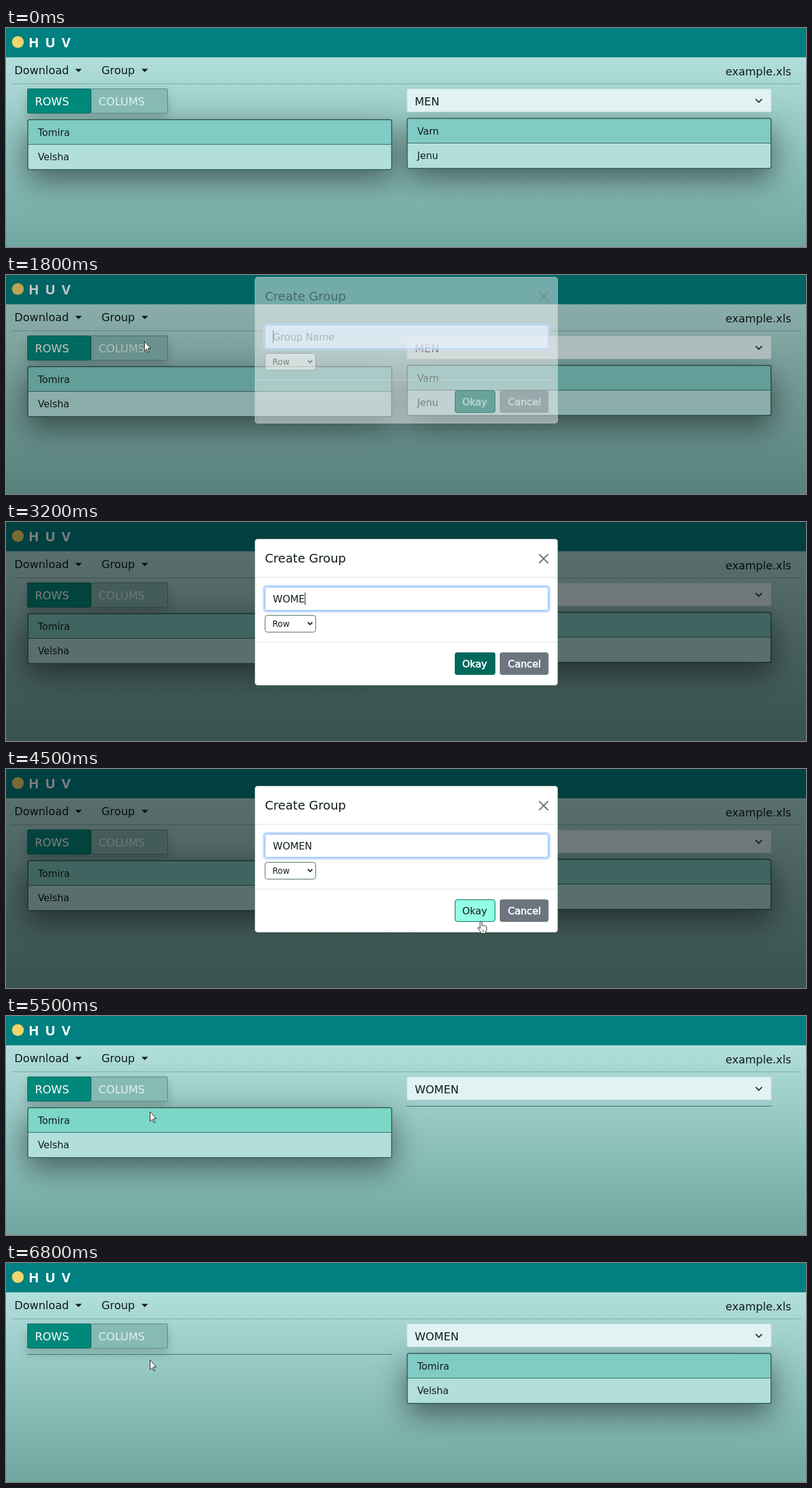
These frames come from a looping animation (1280x351 px, 6900 ms). An HTML page with a canvas:

```html
<!DOCTYPE html>
<html lang="en">
<head>
<meta charset="utf-8">
<title>Group editor</title>
<style>
html, body { margin: 0; width: 100%; height: 100%; overflow: hidden; }
canvas { display: block; }
</style>
</head>
<body>
<canvas id="stage" width="1280" height="351"></canvas>
<script>
const ctx = document.getElementById('stage').getContext('2d');
const LOOP = 6900, STEP = 100;
const SANS = '"DejaVu Sans", Verdana, sans-serif';
const INK = '#101c1b';
const FIRST = 'Tomira', SECOND = 'Velsha', MEN = ['Varn', 'Jenu'];

// Pointer trips: [time, x, y] waypoints; the pointer is hidden outside a trip.
const TRIPS = [
  { end: 2000, points: [[200, 1210, 300], [300, 1058, 314], [400, 760, 225], [500, 445, 122],
    [600, 290, 85], [700, 225, 67], [800, 205, 63], [1200, 205, 63], [1500, 221, 106]] },
  { end: LOOP, points: [[3900, 248, 116], [4100, 410, 157], [4300, 665, 221], [4500, 760, 244],
    [4800, 760, 244], [4900, 742, 236], [5000, 650, 196], [5100, 520, 146], [5200, 385, 119],
    [5300, 290, 128], [5400, 242, 146], [5500, 230, 153], [6700, 230, 153], [6800, 230, 155]] }
];
const ARROW = new Path2D('M.5.5V16L4 12.5 6.5 18 8.5 17.2 6.2 11.5H10.5Z');
const HAND = new Path2D('M-1.5 12V1.5a1.5 1.5 0 0 1 3 0V7l1-.5 2 .7 1-.2 2 .8h.5' +
  'q1 .6 1 2V14l-2 4v1.5H0l-1-3-4-5q-.5-2 1.5-1.5z');

function text(str, x, middle, size, color = INK, weight = 400, family = SANS) {
  ctx.font = `${weight} ${size}px ${family}`;
  ctx.fillStyle = color;
  ctx.fillText(str, x, middle + size * 0.365);
}

// Regular letters thickened slightly, as on the dialog's dark buttons.
function heavyText(str, x, middle, size, color) {
  text(str, x, middle, size, color);
  ctx.strokeStyle = color;
  ctx.lineWidth = 0.6;
  ctx.strokeText(str, x, middle + size * 0.365);
}

function box(x, y, w, h, fill, { radius = 0, border, width = 1, shadow } = {}) {
  ctx.save();
  ctx.beginPath();
  ctx.roundRect(x, y, w, h, radius);
  if (shadow) [ctx.shadowOffsetY, ctx.shadowBlur, ctx.shadowColor] = shadow;
  ctx.fillStyle = fill;
  ctx.fill();
  ctx.restore();
  if (!border) return;
  ctx.beginPath();
  ctx.roundRect(x + width / 2, y + width / 2, w - width, h - width, radius);
  ctx.strokeStyle = border;
  ctx.lineWidth = width;
  ctx.stroke();
}

function line(points, color, width) {
  ctx.beginPath();
  points.forEach(([x, y]) => ctx.lineTo(x, y));
  ctx.strokeStyle = color;
  ctx.lineWidth = width;
  ctx.stroke();
}

function chevron(x, y, size, width) {
  line([[x - size, y - size / 2], [x, y + size / 2], [x + size, y - size / 2]], '#263230', width);
}

function menuTitle(label, x, caretX, color) {
  text(label, x, 68, 17.5, color);
  ctx.beginPath();
  ctx.moveTo(caretX - 5.3, 65.5);
  ctx.lineTo(caretX + 5.3, 65.5);
  ctx.lineTo(caretX, 70.8);
  ctx.fill();
}

const listHeight = rows => 4 + 39 * rows.length;

function listShadow(x, y, rows) {
  if (rows.length) box(x, y, 584, listHeight(rows), '#80cbc4',
    { radius: 4, shadow: [16, 47, 'rgba(0,0,0,.5)'] });
}

function list(x, y, rows, hovered) {
  if (!rows.length) return box(x, y, 584, 1, '#3d706b');
  box(x, y, 584, listHeight(rows), '#b2dfdb', { radius: 4 });
  rows.forEach((name, i) => {
    const top = y + 2 + 39 * i;
    box(x + 1, top, 582, 38, i ? '#b2dfdb' : hovered ? '#7cd7c8' : '#80cbc4');
    if (i) box(x, top - 1, 584, 1, '#356b65');
    text(name, x + 17, top + 19 + i * 0.7, 15.4);
  });
  box(x, y, 584, listHeight(rows), 'transparent', { radius: 3, border: '#35665f', width: 1.7 });
}

function page(t) {
  const sky = ctx.createLinearGradient(0, 45, 0, 351);
  sky.addColorStop(0, '#b2dfdb');
  sky.addColorStop(1, '#6fa6a0');
  box(0, 0, 1280, 351, sky);

  const left = t < 5700 ? [FIRST, SECOND] : t < 6300 ? [SECOND] : [];
  const right = t < 4700 ? MEN : t < 5700 ? [] : t < 6300 ? [FIRST] : [FIRST, SECOND];
  listShadow(34, 146, left);
  listShadow(641, 144, right);

  box(0, 0, 1280, 47, '#008080');
  ctx.beginPath();
  ctx.arc(19, 22.5, 9.5, 0, 7);
  ctx.fillStyle = '#f2d56b';
  ctx.fill();
  [...'HUV'].forEach((c, i) =>
    text(c, 36 + 26.5 * i, 22.5, 22, '#fff', 700, '"Open Sans", "Noto Sans", sans-serif'));

  menuTitle('Download', 13.5, 116, INK);
  menuTitle('Group', 152.8, 222, t >= 700 && t < 1300 ? '#0d63c4' : INK);
  text('example.xls', 1151.2, 70, 17.5);
  box(10, 89, 1262, 1, 'rgba(0,0,0,.22)');

  const soft = [8, 16, 'rgba(0,0,0,.18)'];
  box(34, 97, 225, 40, '#87bab5', { radius: 2, shadow: soft });
  box(136, 97, 123, 40, '#87bab5', { radius: 2, border: '#5a8a84' });
  box(34, 97, 102, 40, '#00897b', { radius: 2, border: '#00695c' });
  text('ROWS', 46.2, 117.5, 17.6, '#fff');
  text('COLUMS', 148, 117.5, 17.6, '#dff1ef');

  box(641, 97, 584, 38, '#e0f2f1', { radius: 4, border: '#bdd8d5' });
  text(t < 4700 ? 'MEN' : 'WOMEN', 654, 117.5, 17.5);
  chevron(1204.5, 116.5, 5, 1.8);

  list(34, 146, left, t >= 5400);
  list(641, 144, right, false);
}

function dropdown(t) {
  box(137.5, 91, 155, 95, '#fff',
    { radius: 4, border: '#8fb0ac', shadow: [8, 18, 'rgba(0,0,0,.25)'] });
  if (t >= 1400) box(138.5, 92, 153, 31, '#e9ecef');
  ['Create Group', 'Delete Group', 'Rename Group'].forEach((label, i) =>
    text(label, 153.8, 107.3 + 31.5 * i, 15.6));
}

function dialog(t) {
  const opening = t < 1900;
  const alpha = opening ? 0.45 : 1;
  box(0, 0, 1280, 351, `rgba(0,0,0,${0.5 * alpha})`);
  ctx.save();
  ctx.globalAlpha = alpha;
  if (opening) ctx.translate(0, -24);

  box(398, 27, 485, 235, '#fff', { radius: 5, border: '#b9c4c3' });
  text('Create Group', 414.2, 58, 19.4);
  line([[853, 51.5], [867.5, 66]], '#767676', 2.2);
  line([[867.5, 51.5], [853, 66]], '#767676', 2.2);
  box(399, 88, 483, 1, '#dee2e6');
  box(399, 192, 483, 1, '#dee2e6');

  box(411, 101, 460, 44, '#c2dbfe', { radius: 6 });
  box(414, 104, 454, 38, '#fff', { radius: 4, border: '#86b7fe' });
  const typed = 'WOMEN'.slice(0, Math.max(0, (t - 2800) / STEP));
  if (typed) text(typed, 427, 123, 15.6);
  else text('Group Name', 427, 123, 15.6, '#6c757d');
  if (t < 2200 || (t >= 2600 && t < 3700)) {
    ctx.font = `400 15.6px ${SANS}`;
    box(Math.round(427 + ctx.measureText(typed).width), 113, 1, 20, INK);
  }

  box(414, 149, 82, 28, '#fff', { radius: 4, border: '#4b6b67' });
  text('Row', 426.3, 163.5, 13.2);
  chevron(486.5, 162.5, 3.6, 2);

  const hot = t >= 4400;
  box(718, 209, 65, 36, hot ? '#93ffe4' : '#00695c', { radius: 4, border: '#00695c' });
  if (hot) text('Okay', 730, 227.5, 15.6);
  else heavyText('Okay', 730, 227.5, 15.6, '#fff');
  box(790, 209, 78, 36, '#6c757d', { radius: 4 });
  heavyText('Cancel', 803, 227.5, 15.6, '#fff');
  ctx.restore();
}

function pointer(t) {
  const trip = TRIPS.find(({ points, end }) => t >= points[0][0] && t < end);
  if (!trip) return;
  const next = trip.points.findIndex(p => p[0] > t);
  const b = trip.points.at(next), a = next < 0 ? b : trip.points[next - 1];
  const k = a === b ? 0 : (t - a[0]) / (b[0] - a[0]);
  const [x, y] = [1, 2].map(i => a[i] + (b[i] - a[i]) * k);
  const shape = (t >= 700 && t < 1800) || (t >= 4400 && t < 4700) ? HAND : ARROW;
  ctx.save();
  ctx.translate(x, y);
  ctx.lineJoin = 'round';
  ctx.lineWidth = 1;
  ctx.fillStyle = '#fff';
  ctx.strokeStyle = '#222';
  ctx.fill(shape);
  ctx.stroke(shape);
  if (shape === HAND) line([[2, 13], [2, 17], [4.5, 17], [4.5, 13]], '#555', 0.7);
  ctx.restore();
}

function draw() {
  const t = Math.floor(performance.now() % LOOP / STEP) * STEP;
  page(t);
  if (t >= 900 && t < 1800) dropdown(t);
  if (t >= 1800 && t < 4700) dialog(t);
  pointer(t);
  requestAnimationFrame(draw);
}
draw();
</script>
</body>
</html>
```
